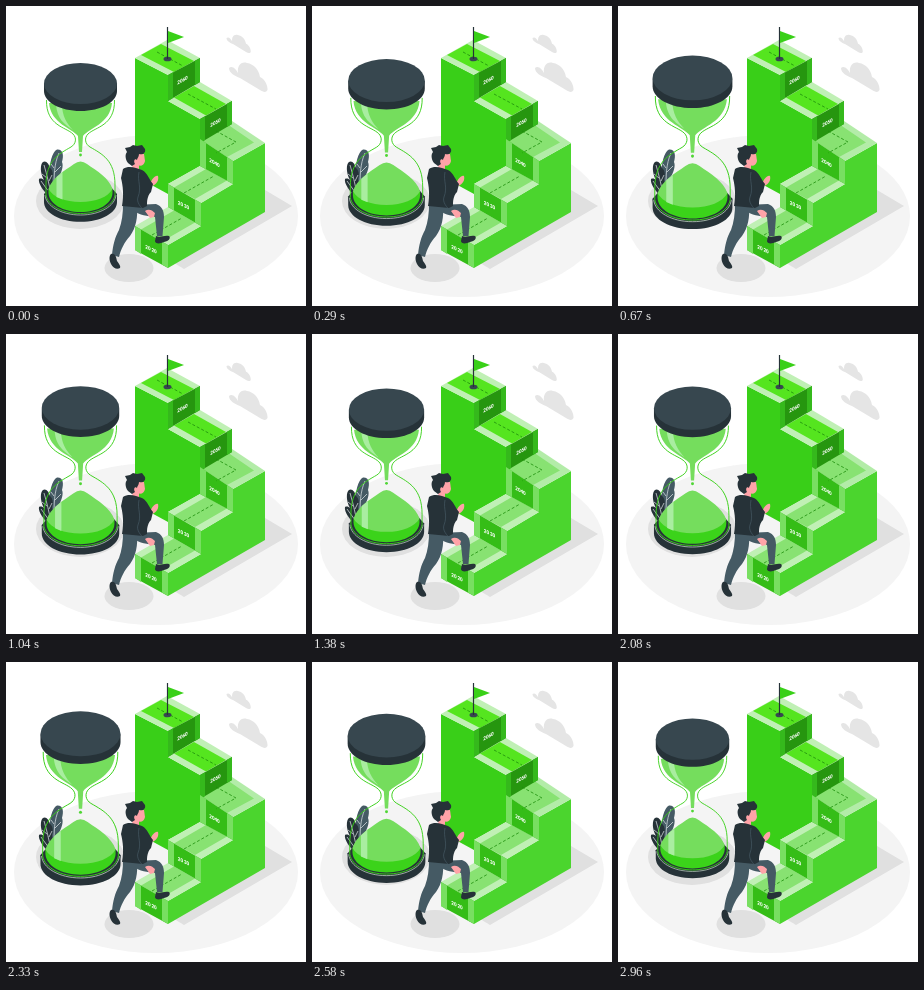
Animation of 300x300 px, one loop 3000 ms. Source, as an HTML page:

```html
<!DOCTYPE html>
<html lang="en">
<head>
<meta charset="utf-8">
<title>Climbing the steps</title>
<style>
html, body { margin: 0; width: 100%; height: 100%; overflow: hidden; background: #fff; }
svg { display: block; width: 100vw; height: 100vh; }
text { font: 900 5.2px Lato, sans-serif; fill: #fff; text-anchor: middle; }
.dash { fill: none; stroke: #1d8d0c; stroke-width: .8; stroke-dasharray: 3 2; }
.line { fill: none; stroke: #39d018; stroke-width: .9; }
.dark { fill: #263238; }
.skin { fill: #ffa3a8; }
.vein { fill: none; stroke: #e4eaec; stroke-width: .7; }
</style>
</head>
<body>
<svg viewBox="0 0 300 300">
  <ellipse cx="150" cy="210" rx="142" ry="81" fill="#f4f4f4"/>
  <g fill="#e0e0e0">
    <ellipse cx="74" cy="195" rx="44" ry="28"/>
    <ellipse cx="123" cy="262" rx="24.5" ry="14"/>
    <path d="M259 184L286 200L178 263L160 252Z"/>
  </g>
  <g fill="#e5e5e5">
    <path id="cloud" d="M223 62C226 59 230 63 232 67C231 60 235 55 241 57C248 58 253 64 254 71C259 73 262 80 261.500 84C260 87 257 86 254 84L234 72C229 70 223 67 223 62Z"/>
    <use href="#cloud" transform="translate(80 -7) scale(.63)"/>
  </g>

  <g id="stairs">
    <path fill="#39cf18" d="M129 52L162 69V95L194 113V160L162 178V188L129 170Z"/>
    <path fill="#4bd52e" d="M162 239L195 220V197L227 178V155L259 137V206L162 262Z"/>
    <g fill="#c0f0b5">
      <path d="M129 52L161 34L194 52L162 69Z"/>
      <path d="M162 95L194 76L226 95L194 113Z"/>
      <path d="M194 133L226 115L259 137L227 155Z" fill="#b3ecA8"/>
      <path d="M162 178L194 160L227 178L195 197Z"/>
      <path d="M129 220L162 201L195 220L162 239Z"/>
    </g>
    <g fill="#55e51f">
      <path d="M135 49L155 38L188 55L168 66Z"/>
      <path d="M168 91.500L188 80L220 98L200 109.500Z"/>
    </g>
    <g fill="#88e272">
      <path d="M194 133L221 151L248 136.500L221 118Z"/>
      <path d="M168 181.500L200 163L221 174.500L189 193Z"/>
      <path d="M135 223.500L168 204.500L189 216.500L156 235.500Z"/>
    </g>
    <path fill="#26960f" d="M162 69L194 52V76L162 95ZM194 113L226 95V118L194 137Z"/>
    <path fill="#35b91c" d="M162 69L167 66.300V92L162 95ZM189 54.700L194 52V76L189 79ZM194 113L199 110.300V134L194 137ZM221 97.700L226 95V118L221 121Z"/>
    <path fill="#35bd17" d="M194 133L227 155V178L194 160ZM162 178L195 197V220L162 201ZM129 220L162 239V262L129 244Z"/>
    <path fill="#78df61" d="M194 133L200 137V163.300L194 160ZM221 151L227 155V178L221 174.700ZM162 178L168 181.500V204.500L162 201ZM189 193.500L195 197V220L189 216.500ZM129 220L135 223.500V248L129 244ZM156 235.500L162 239V262L156 258.500Z"/>
    <path class="dash" d="M151 46L177 60M182 88L210 103M210 125L230 136L210 147M178 187L208 170M146 229L176 212"/>
    <g id="years"></g>
    <ellipse cx="161.500" cy="53" rx="4" ry="2.300" fill="#37474f"/>
    <path d="M161.500 21V53" stroke="#263238" stroke-width="1.200"/>
    <path d="M162 25L178 31L162 37Z" fill="#39d018"/>
  </g>

  <g id="plant">
    <path fill="#455a64" d="M45 190C43 180 46 176 44 168C43 158 46 146 51 143.500C57 143 58 149 56 156C58 160 55 168 52 172C51 178 49 184 49 190Z"/>
    <path class="dark" d="M43 190C37 185 32 177 33 173C35 172 37 173 38 174C34 167 34 158 37 156C40 154 43 158 44 162C46 163 48 168 46 173C47 178 46 184 47 190Z"/>
    <path class="vein" d="M35 175L43 186M38 159C41 169 43 178 45 188M53 147C48 158 48 170 48 184M41 172L36 168M43 175L46 169M49 166L55 160M48 162L45 158"/>
  </g>

  <g id="hourglass">
    <path class="dark" d="M38 188V196C38 207 54 215.800 74.500 215.800S111 207 111 196V188Z"/>
    <path class="dark" d="M38 188C38 199 54 208.500 74.500 208.500S111 199 111 188L104 180H45Z"/>
    <path d="M39 189C40 200 55 209 74.500 209S109 200 110 189" fill="none" stroke="#c4d8c6" stroke-width=".7"/>
    <path fill="#3bd31a" d="M42.500 183H106.500V187C106 198 92 206 74.500 206S43 198 42.500 187Z"/>
    <path fill="#75dd5d" d="M42.500 183C46 172 58 165 68 158Q74.500 153 81 158C91 165 103 172 106.500 183C102 191 90 196 74.500 196S47 191 42.500 183Z"/>
    <path fill="#a9eda0" d="M50.500 171L56.500 166V193.500L50.500 191Z"/>
    <path fill="#75dd5d" d="M43 97H106C104 118 83 122 77 130L76 146H73L72 130C66 122 45 118 43 97Z"/>
    <path fill="#a9eda0" d="M50 98H56C56 110 61 118 67 124C58 118 51 113 50 98Z"/>
    <circle cx="74.500" cy="149" r="1.400" fill="#4ed633"/>
    <path class="line" d="M40.500 94C40 120 60 121 67 128C71 132 70 138 65 141C53 148 40 154 40 179V189C42 200 57 207.500 74.500 207.500S107 200 109 189V179C109 154 96 148 84 141C79 138 78 132 82 128C89 121 109 120 108.500 94"/>
    <path class="dark" d="M38 78V85C38 96 54 105 74.500 105S111 96 111 85V78Z"/>
    <ellipse cx="74.500" cy="77.500" rx="36.500" ry="20.500" fill="#37474f"/>
  </g>

  <g id="man">
    <path fill="#455a64" d="M117 198L131 199C132 211 130 222 124 230C118 237 115 243 113 251L106 249C107 239 109 231 113 224C116 216 117 207 117 198Z"/>
    <path fill="#455a64" d="M128 199L150 198C156 200 158 205 158 211L156.500 230L151 230L149 211C142 210 133 209 128 205Z"/>
    <path class="dark" d="M105 248C109 247 110 250 111 255C113 258 115 260 114 262C111 264 107 262 105 258C103 254 103 250 105 248ZM150 230C154 232 158 229 163 230C165 232 163 235 158 236C154 238 149 238 149 235Z"/>
    <path class="skin" d="M139 205C143 202 147 205 149 207L148 211L144 212ZM144 178C146 173 149 169 152 170C153 174 151 178 146 180ZM127 154H133V164L126 163Z"/>
    <path class="skin" d="M129 148L138 148L139 155C138 160 134 161 129 158Z"/>
    <path class="dark" d="M122 157C119 153 119 148 121 146L119 142L124 141L127 139L131 140L136 139L139 143C140 147 137 149 133 148C133 151 131 152 131 154C129 152 127 155 129 158L126 160Z"/>
    <path class="dark" d="M117 163C123 159 130 162 136 164C142 167 143 174 147 178L145 186C141 190 141 196 141 200L137 202L116 200C118 189 117 180 115 172Z"/>
    <path d="M133 166C131 175 136 181 132 191C130 196 135 202 139 205" fill="none" stroke="#455a64" stroke-width=".7"/>
  </g>
</svg>
<script>
const LOOP = 3000;
const CENTER = { x: 74.5, y: 137 };
const PULSE = [[0, 1], [590, 1.1], [1740, 1], [2350, 1.1], [LOOP, 1]];
const hourglass = document.getElementById('hourglass');

// Baseline centre and isometric slope of each label
const labels = [
  ['20 20', 145, 245, .5], ['20 30', 177.5, 201, .5], ['2040', 208.5, 158.5, .6],
  ['2050', 209.5, 118.5, -.53], ['2060', 176.5, 76, -.53]
];
document.getElementById('years').innerHTML = labels.map(([year, x, y, slope]) =>
  `<text transform="matrix(.86 ${slope * .86} 0 1 ${x} ${y})">${year}</text>`).join('');

function scaleAt(time) {
  const i = PULSE.findIndex(([end]) => end > time);
  const [t0, s0] = PULSE[i - 1];
  const [t1, s1] = PULSE[i];
  return s0 + (s1 - s0) * (time - t0) / (t1 - t0);
}

function render(time) {
  const { x, y } = CENTER;
  hourglass.setAttribute('transform',
    `translate(${x} ${y}) scale(${scaleAt(time % LOOP)}) translate(${-x} ${-y})`);
}

const start = performance.now();
function tick() {
  render(performance.now() - start);
  requestAnimationFrame(tick);
}
tick();
</script>
</body>
</html>
```
